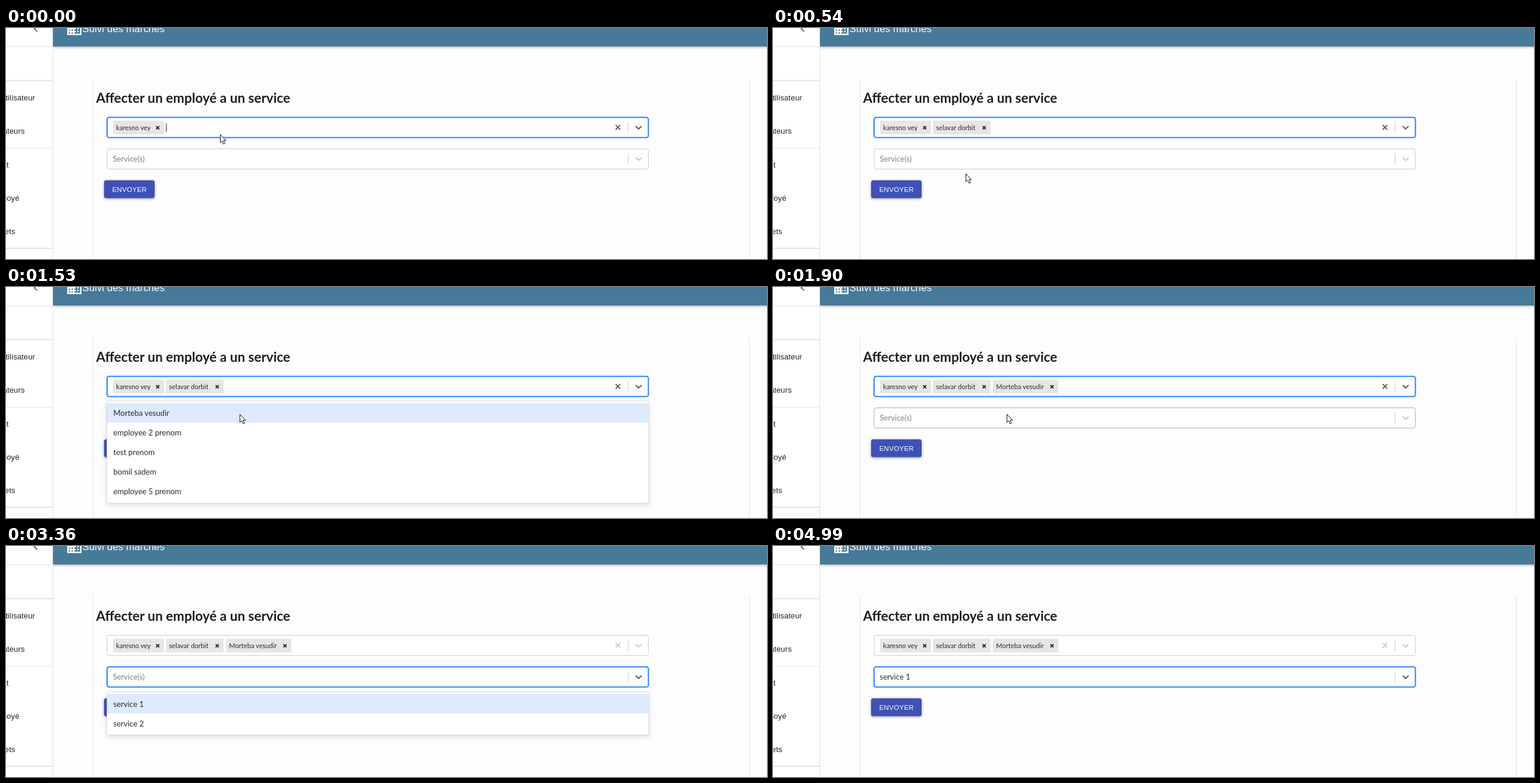
Animation of 1280x389 px, one loop 5740 ms. Source, as an HTML page:

```html
<!DOCTYPE html>
<html lang="fr">
<head>
<meta charset="utf-8">
<title>Affecter un employé</title>
<style>
html, body { margin: 0; width: 100%; height: 100%; overflow: hidden; background: #fdfdfd; }
svg { display: block; }
text { font: 13.1px Lato, sans-serif; fill: #2b2b2b; white-space: pre; }
.ui { font: 13px "Liberation Sans", Arial, sans-serif; letter-spacing: .12px; fill: #222; }
.title { font-size: 22.5px; font-weight: 700; fill: #1f1f1f; }
.chip { font-size: 11.15px; }
.hint { fill: #808080; }
.brand { font-size: 16.7px; fill: #fff; }
.send { font-size: 11.5px; letter-spacing: .3px; fill: #fff; }
.bar { filter: drop-shadow(0 1.5px 2px rgba(0,0,0,.4)); }
.menu { filter: drop-shadow(0 3px 4px rgba(0,0,0,.12)); }
.line { fill: none; stroke: #e3e3e3; }
</style>
</head>
<body>
<svg width="1280" height="389" viewBox="0 0 1280 389">
  <rect width="1280" height="389" fill="#fdfdfd"/>
  <rect class="bar" x="79" y="-20" width="1210" height="51" fill="#477a99"/>
  <rect y="0" width="79" height="389" fill="#fff"/>
  <path class="line" d="M78.5 0V389M0 31.5H78M0 202.5H78M146.5 85V389M1250.5 85V389"/>
  <path class="line" stroke-width="2" d="M0 88.5H78M0 371H78"/>
  <path d="M53-3.500L47.500 1.500 52.500 6" fill="none" stroke="#666" stroke-width="1.7"/>
  <g transform="translate(100.600 -13.200) scale(1.200)" fill="#fff">
    <path d="M12 7V3H2v18h20V7H12zM6 19H4v-2h2v2zm0-4H4v-2h2v2zm0-4H4V9h2v2zm4 8H8v-2h2v2zm0-4H8v-2h2v2zm0-4H8V9h2v2zm10 8h-8v-2h2v-2h-2v-2h2v-2h-2V9h8v10zm-2-8h-2v2h2v-2zm0 4h-2v2h2v-2z"/>
  </g>
  <text class="ui brand" x="128.500" y="7">Suivi des marchés</text>
  <g class="side" text-anchor="end">
    <text class="ui" x="49" y="122">utilisateur</text>
    <text class="ui" x="31.500" y="178">utilisateurs</text>
    <text class="ui" x="4.500" y="235">projet</text>
    <text class="ui" x="22.500" y="291">employé</text>
    <text class="ui" x="15.500" y="347">projets</text>
  </g>
  <text class="title" x="151.500" y="126">Affecter un employé a un service</text>
  <g id="scene"></g>
</svg>
<script>
const LOOP = 5740;
const scene = document.getElementById('scene');

const chips = [
  { name: 'karesno vey', x: 180, w: 86, from: 0 },
  { name: 'selavar dorbit', x: 269, w: 97, from: 540 },
  { name: 'Morteba vesudir', x: 370, w: 110, from: 1900 }
];
const others = ['employee 2 prenom', 'test prenom', 'bomil sadem', 'employee 5 prenom'];

// Pointer path: time, x, y
const path = [
  [90, 360, 179], [360, 324, 245], [540, 324, 245], [900, 415, 166], [1080, 421, 170],
  [1530, 393, 214], [2089, 393, 214], [2090, 391, 217], [2180, 388, 222], [2910, 388, 222],
  [3180, 366, 254], [3540, 366, 254], [3990, 226, 279], [4449, 226, 279],
  [4450, 420, 291], [4630, 1119, 333], [4900, 1249, 384]
];

const within = (t, a, b) => t >= a && t < b;

function tick(t) {
  const slip = 10 * [1900, 2090, 2550, 4450].filter(s => s <= t).length;
  return Math.floor((t - slip) / 90) * 90 + slip;
}

function pointerAt(t) {
  const i = path.findIndex(k => k[0] > t);
  if (i === 0) return path[0].slice(1);
  if (i < 0) return path[path.length - 1].slice(1);
  const [t0, x0, y0] = path[i - 1], [t1, x1, y1] = path[i];
  const p = (t - t0) / (t1 - t0);
  return [Math.round(x0 + (x1 - x0) * p), Math.round(y0 + (y1 - y0) * p)];
}

const text = (x, y, s, cls = '') => `<text class="${cls}" x="${x}" y="${y}">${s}</text>`;
const stroke = (d, color, w) => `<path d="${d}" fill="none" stroke="${color}" stroke-width="${w}"/>`;
const cross = (x, y, r, color, w) =>
  stroke(`M${x - r} ${y - r}l${2 * r} ${2 * r}m0 ${-2 * r}l${-2 * r} ${2 * r}`, color, w);
const caret = (x, y) => stroke(`M${x} ${y}v15`, '#222', 1);

function control(y, focused, border, icon) {
  const edge = focused ? '#2684ff' : border;
  return `<rect x="170" y="${y + .5}" width="910.5" height="34" rx="3.5" fill="#fff" stroke="${edge}" stroke-width="${focused ? 2 : 1}"/>`
    + stroke(`M1046.5 ${y + 8}v19`, '#ccc', 1)
    + stroke(`M1059 ${y + 15.3}l5 4.7 5-4.7`, icon, 2.1);
}

function chip({ name, x, w }) {
  return `<rect x="${x}" y="156" width="${w}" height="23" rx="2" fill="#e6e6e6"/>`
    + text(x + 5.3, 171.5, name, 'chip') + cross(x + w - 10.8, 168, 2.6, '#1c1c1c', 1.7);
}

function menu(y, items, active) {
  const h = items.length * 33 + 7;
  return `<rect class="menu" x="169.5" y="${y}" width="911.5" height="${h}" rx="3.5" fill="#fff" stroke="#000" stroke-opacity=".12"/>`
    + items.map((s, i) => {
      const top = y + 3.5 + i * 33;
      const fill = i === active ? `<rect x="170" y="${top}" width="911" height="33" fill="#deeafd"/>` : '';
      return fill + text(180.5, top + 21.5, s);
    }).join('');
}

function button(hover) {
  return `<rect class="bar" x="165" y="256.500" width="85" height="30" rx="3.5" fill="${hover ? '#3340a0' : '#3f51b5'}"/>`
    + '<text class="ui send" x="207.800" y="276" text-anchor="middle">ENVOYER</text>';
}

function pointer(x, y, hand) {
  const shape = hand
    ? 'M3 2c0-2 3-2 3 0v5l6 1.300c1.500.4 2 1.200 1.800 2.700l-.8 4-1.500 3.500H4.500L1 13.500-1.500 10c-1-1.700.8-2.600 2-1.500L3 10.500zM6 7v3M8.700 8v2.500M11.300 8.500v2.500'
    : 'M0 0V13.500L3.100 10.700 5.400 16 7.700 15 5.400 9.900H9.500Z';
  return `<path transform="translate(${x + .5} ${y + .5})" d="${shape}" fill="#fff" stroke="#111" stroke-linejoin="round"/>`;
}

function draw(t) {
  const [x, y] = pointerAt(t);
  const first = t < 2730;
  const openA = within(t, 90, 540) || within(t, 1080, 1900);
  const openB = within(t, 2730, 3540);
  const hoverB = !openA && y >= 204 && y < 238 && x < 1080;
  const hand = within(t, 3900, 4450);
  const fading = within(t, 2730, 2820);
  const iconA = first ? '#606060' : fading ? '#a8a8a8' : '#ccc';

  let out = control(150, first, fading ? '#bcc3d0' : '#ccc', iconA) + cross(1029.3, 167.3, 3.9, iconA, 2)
    + chips.filter(c => t >= c.from).map(chip).join('')
    + control(203, !first, hoverB ? '#b0b0b0' : '#ccc', first ? '#ccc' : '#606060')
    + (t < 3540 ? text(179.5, 225, 'Service(s)', 'hint') : text(179.5, 225, 'service 1'))
    + button(hand);

  if (t < 540) out += caret(269.5, 160);
  if (within(t, 1080, 1530)) out += caret(370.5, 160);
  if (within(t, 2090, 2550)) out += caret(483.5, 160);
  if (within(t, 2730, 3180)) out += caret(180.5, 213);

  if (openA) {
    const names = chips.slice(1).filter(c => t < c.from).map(c => c.name).reverse();
    out += menu(192, [...names, ...others], y >= 229 ? 1 : 0);
  }
  if (openB) out += menu(245.5, ['service 1', 'service 2'], 0);

  const shown = t < 4720 && !within(t, 3360, 3540) || within(t, 4900, 4990);
  if (shown) out += pointer(x, y, hand);
  scene.innerHTML = out;
}

let last = -1;
const start = performance.now();
function frame() {
  const t = tick((performance.now() - start) % LOOP);
  if (t !== last) draw(last = t);
  requestAnimationFrame(frame);
}
frame();
</script>
</body>
</html>
```
